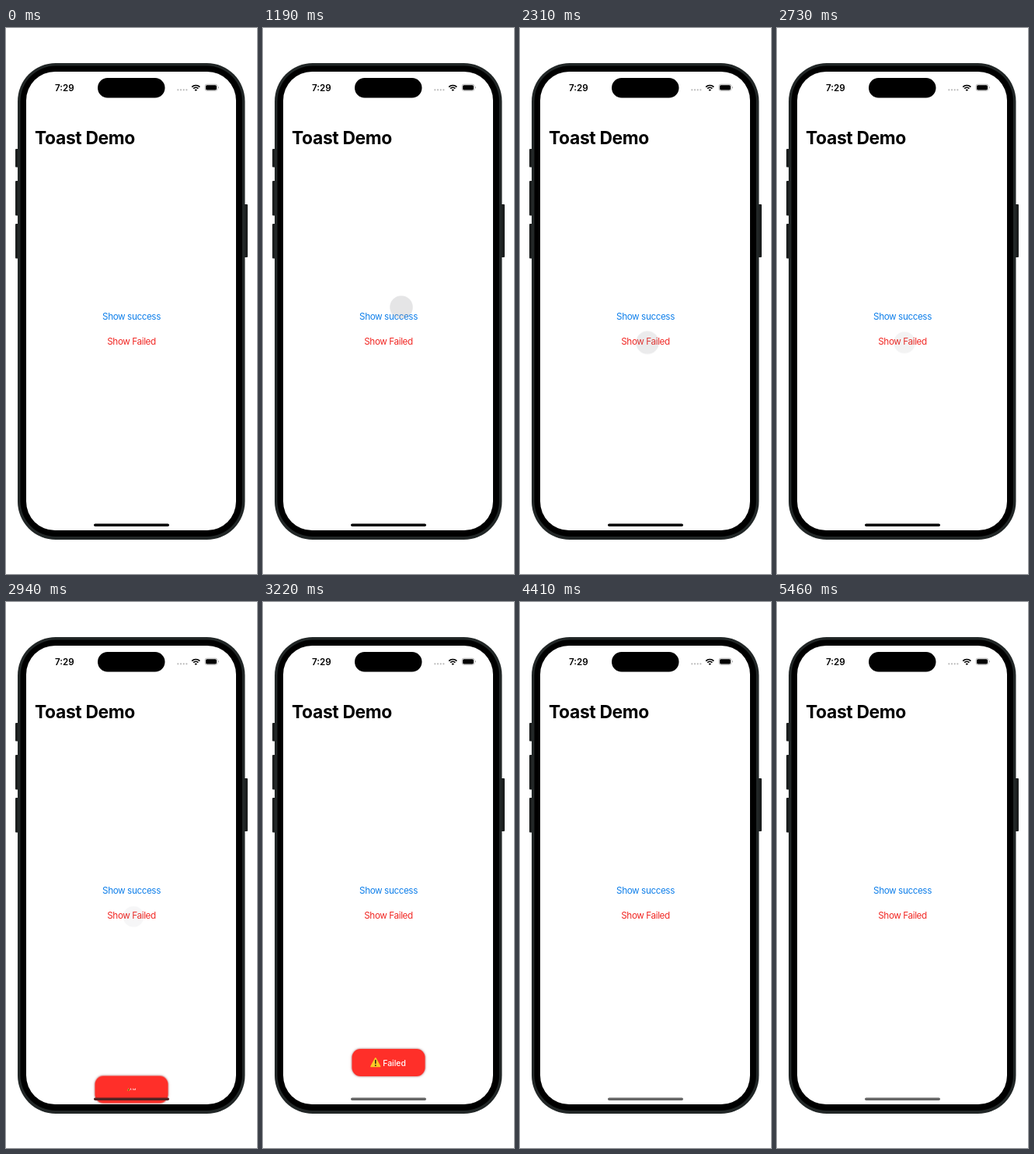
These frames come from a looping animation (323x700 px, 5660 ms). An HTML page:

```html
<!DOCTYPE html>
<html lang="en">
<head>
<meta charset="utf-8">
<title>Toast Demo</title>
<style>
  html, body { margin: 0; width: 100%; height: 100%; overflow: hidden; background: #fff; }
  svg { display: block; width: 323px; height: 700px; }
  text { font-family: Inter, Roboto, sans-serif; }
  .soft { filter: blur(.3px); }
  .title { font-size: 22.8px; font-weight: 700; letter-spacing: -.33px; }
  .clock { font-size: 11.6px; font-weight: 600; }
  .link { font-size: 11.7px; letter-spacing: -.4px; text-anchor: middle; }
  .label { font-size: 10.4px; font-weight: 500; fill: #fff; }

  .touch, .dot, .toast, .content, .bar { animation: 5660ms linear infinite; }
  .touch { animation-name: move; }
  .dot { animation-name: press; }
  .toast { animation-name: rise; }
  .content { animation-name: grow; transform-origin: 161.5px 590.5px; }
  .bar { animation-name: dim; }
  .card { filter: drop-shadow(0 0 1.2px rgba(190, 60, 60, .6)) drop-shadow(0 0 1.6px rgba(60, 20, 20, .3)); }

  @keyframes move {
    0%, 25.97% { transform: translate(178px, 358px); }
    28.45% { transform: translate(163.5px, 428px); }
    29.68%, 32.6% { transform: translate(164px, 421px); }
    39.58%, 100% { transform: translate(164px, 403.3px); }
  }
  @keyframes press {
    0%, 13.6% { opacity: 0; transform: scale(1); }
    23.5%, 30.92% { opacity: .3; transform: scale(1); }
    32.1%, 32.9% { opacity: .48; transform: scale(.74); }
    40.7% { opacity: .18; transform: scale(1); }
    51.94% { opacity: .08; transform: scale(.9); }
    53.5%, 100% { opacity: 0; transform: scale(.9); }
  }
  @keyframes rise {
    0%, 50.7% { transform: translateY(74px); opacity: 1; }
    51.94% { transform: translateY(35px); }
    53.18% { transform: translateY(5px); }
    54.42% { transform: translateY(1px); }
    55.7%, 68.02% { transform: none; opacity: 1; }
    77.9%, 100% { transform: none; opacity: 0; }
  }
  @keyframes grow {
    0%, 51.94% { transform: scale(.23); }
    53.18% { transform: scale(.66); }
    54.42% { transform: scale(.9); }
    56.8%, 100% { transform: scale(1); }
  }
  @keyframes dim {
    0%, 51.2% { fill: #000; }
    51.94% { fill: #522222; }
    53.18%, 100% { fill: #666; }
  }
</style>
</head>
<body>
<svg viewBox="0 0 323 700">
  <defs>
    <clipPath id="screen"><rect x="26" y="56" width="270" height="588" rx="37"/></clipPath>
  </defs>

  <g fill="#1b1e1e">
    <rect x="12" y="155" width="5" height="23.5" rx="1"/>
    <rect x="12" y="196" width="5" height="44.5" rx="1"/>
    <rect x="12" y="251" width="5" height="44.5" rx="1"/>
    <rect x="305" y="226" width="6" height="68" rx="1"/>
  </g>
  <rect x="15" y="45" width="292.5" height="611" rx="49" fill="#222727"/>
  <rect x="18.5" y="48.5" width="285.5" height="603.5" rx="45.5"/>

  <g class="soft">
    <rect x="26" y="56" width="270" height="588" rx="37" fill="#fff"/>
    <rect x="118" y="64" width="86.5" height="25.5" rx="12.75"/>

    <text class="clock" x="63" y="81">7:29</text>
    <g fill="#b8b8b8">
      <circle cx="221.3" cy="79.3" r="1.1"/>
      <circle cx="225" cy="79.3" r="1.1"/>
      <circle cx="228.7" cy="79.3" r="1.1"/>
      <circle cx="232.4" cy="79.3" r="1.1"/>
    </g>
    <g fill="none" stroke="#000" stroke-width="1.7">
      <path d="M239.2 75.6a7.2 7.2 0 0 1 10.2 0"/>
      <path d="M241.2 77.7a4.4 4.4 0 0 1 6.2 0"/>
    </g>
    <path d="M242.6 79.2a2.5 2.5 0 0 1 3.4 0l-1.7 1.8z"/>
    <rect x="256" y="72.2" width="16" height="8.2" rx="2.6" fill="#fff" stroke="#aaa" stroke-width=".8"/>
    <rect x="257" y="73.2" width="14" height="6.2" rx="1.7"/>
    <path d="M273 75v2.6q1-.4 1-1.3t-1-1.3" fill="#aaa"/>

    <text class="title" x="37" y="148.9">Toast Demo</text>
    <text class="link" x="161.5" y="373.8" fill="#0f7fea">Show success</text>
    <text class="link" x="161.5" y="405.8" fill="#f12824">Show Failed</text>
  </g>

  <g clip-path="url(#screen)">
    <g class="toast">
      <rect class="card" x="114.5" y="573" width="94" height="35" rx="11" fill="#ff2f29"/>
      <g class="content">
        <path d="M144.8 585l5.7 10.4h-11.4z" fill="#fbc926" stroke="#fbc926" stroke-width="1.8" stroke-linejoin="round"/>
        <path d="M144.8 587.6v4" stroke="#2b2417" stroke-width="1.5" stroke-linecap="round"/>
        <circle cx="144.8" cy="594.2" r=".9" fill="#2b2417"/>
        <text class="label" x="154.3" y="594.5">Failed</text>
      </g>
    </g>
  </g>
  <rect class="bar" x="113" y="635.5" width="97" height="3.6" rx="1.8"/>

  <g class="touch"><circle class="dot" r="14.8" fill="#8e8e95"/></g>
</svg>
</body>
</html>
```
